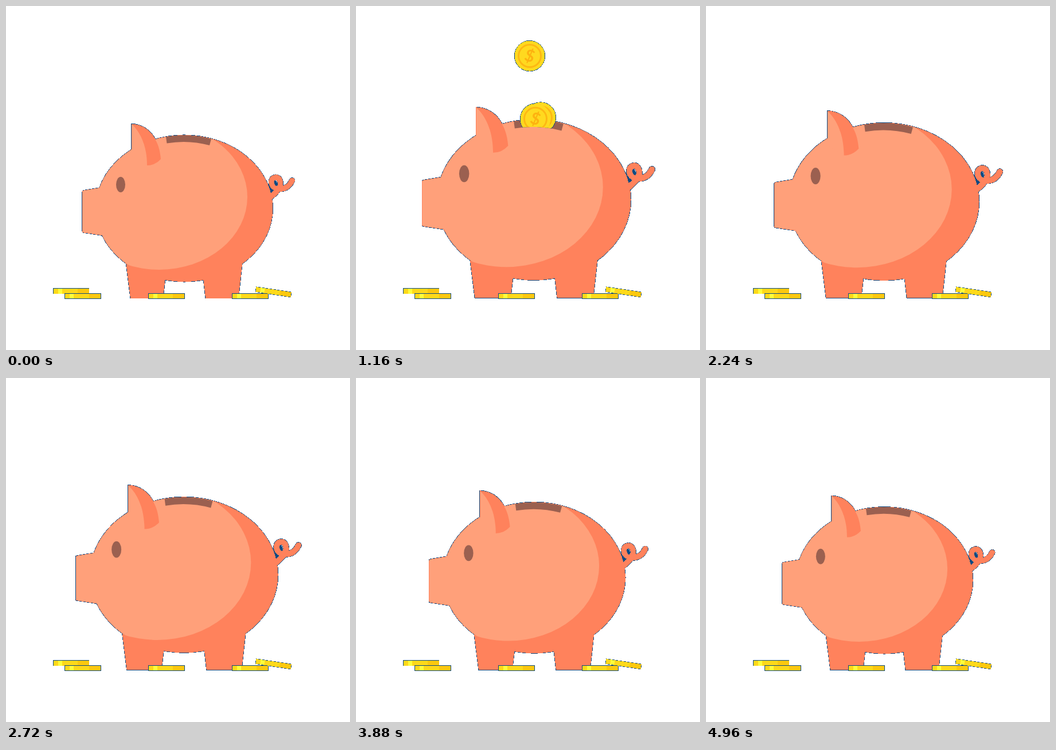
These frames come from a looping animation (600 px wide and 600 px high, 5000 ms). An HTML page:

```html
<!DOCTYPE html>
<html lang="en">
<head>
<meta charset="utf-8">
<title>Piggy bank</title>
<style>
  html, body { margin: 0; width: 100%; height: 100%; overflow: hidden; background: #fff; }
  svg { display: block; width: 100vw; height: 100vh; }
  .light { fill: #ffa07a; }
  .dark { fill: #ff825c; }
  .brown { fill: #9b6050; }
  .navy { fill: #0b4a82; }
  .crisp { shape-rendering: crispEdges; }
  .rim { fill: #0b4a82; stroke: #0b4a82; stroke-width: 1.2; shape-rendering: crispEdges; }
  .curl { fill: none; stroke-linecap: round; stroke-linejoin: round; shape-rendering: crispEdges; }
</style>
</head>
<body>
<svg viewBox="0 0 600 600">
  <defs>
    <g id="outline">
      <ellipse cx="311" cy="353" rx="154.500" ry="128"/>
      <path d="M135 321.600L163 317H190V402L166 400L135 395.300Q133 395 133 393V324Q133 322 135 321.600Z"/>
      <path d="M209 446L217 509.500H274L278 474Z"/>
      <path d="M344 474L348 509.500H405.500L412.500 446Z"/>
      <path d="M219 205.500C238 206 253 217 261 233L250 262H219Z"/>
    </g>
    <clipPath id="skin">
      <ellipse cx="311" cy="353" rx="154" ry="127.500"/>
      <path d="M135 322.100L163 317.500H190V402L166 399.500L135 394.800L133.500 393V324Z"/>
    </clipPath>
    <clipPath id="mouth">
      <path id="lip" d="M0 -600H600V243H355Q318 233 280.500 239.500H0Z"/>
    </clipPath>
    <path id="tail" d="M499 304.500C495 313 488 319 478 319C467 319 462.500 312 463 306C464 298.500 473 296.500 476.500 302C480 308 479 315 475 320C471 325 467 329 462 333"/>
    <g id="bar">
      <rect class="rim" width="62" height="8.500"/>
      <g class="crisp">
        <rect width="62" height="8.500" fill="#ffd91a"/>
        <rect x="8" width="7" height="8.500" fill="#ffff3c"/>
        <rect x="42" width="20" height="8.500" fill="#fcc80f"/>
      </g>
    </g>
    <circle id="halo" class="rim" r="26.500"/>
    <g id="coin">
      <circle class="crisp" r="26.500" fill="#ffd91f"/>
      <circle r="19.500" fill="none" stroke="#fdb813" stroke-width="3"/>
      <text transform="rotate(18)" y="10" text-anchor="middle" font-family="Lato, sans-serif" font-weight="700" font-size="29" fill="#fdb210">$</text>
    </g>
  </defs>

  <g id="pig">
    <use href="#outline" class="rim"/>
    <path class="navy" d="M457 309L468 323L461 328Z"/>
    <use href="#tail" class="curl" stroke="#0b4a82" stroke-width="10.800"/>
    <use href="#tail" class="curl" stroke="#ff825c" stroke-width="9.600"/>
    <ellipse class="navy" cx="470.500" cy="309" rx="2.400" ry="5" transform="rotate(-18 470.500 309)"/>
    <use href="#outline" class="dark crisp"/>
    <ellipse class="light" cx="267" cy="333" rx="154" ry="127" clip-path="url(#skin)"/>
    <path class="light" d="M219.500 206V262L246 278C246 248 237 222 219.500 206Z"/>
    <path class="dark" d="M219.500 206C238 206.500 252.500 217 260.500 233C267 244 269 256 270 267Q260 278 246 278C246 248 237 222 219.500 206Z"/>
    <path class="brown" d="M279 228.200Q318 221 358 232L355 243Q318 233 280.500 239.500Z"/>
    <ellipse class="brown" cx="200" cy="311.500" rx="8" ry="13.500"/>
  </g>

  <g id="drops" clip-path="url(#mouth)"><g id="halos"></g><g id="faces"></g></g>

  <use href="#bar" x="82.500" y="493"/>
  <use href="#bar" x="103" y="501.500"/>
  <use href="#bar" x="249" y="501.500"/>
  <use href="#bar" x="395" y="501.500"/>
  <use href="#bar" transform="translate(436.500 490) rotate(8.500)"/>
</svg>
<script>
  const LOOP = 5000;
  const SHRINK = 0.0000272;
  const REST = 200, GROW = 890, PEAK = 1370, SETTLE = 1640;
  const TOP = -28, END = 245;
  const byId = id => document.getElementById(id);
  const mix = (a, b, u) => a + (b - a) * u;

  function addUse(parent, href) {
    const el = document.createElementNS("http://www.w3.org/2000/svg", "use");
    el.setAttribute("href", href);
    byId(parent).append(el);
    return el;
  }

  const coins = [
    { x: 322, start: 840, time: 394 },
    { x: 313, start: 900, time: 317 },
    { x: 303, start: 1040, time: 287 }
  ];
  for (const c of coins) c.parts = [addUse("halos", "#halo"), addUse("faces", "#coin")];

  // Slow deflation, a quick swell as coins land, then a small settle.
  function pigScale(t) {
    const slow = time => 1 + (LOOP - time) * SHRINK;
    const small = 1 - REST * SHRINK, big = 1.125;
    if (t < REST) return 1 - t * SHRINK;
    if (t < GROW) return small;
    if (t < PEAK) return mix(small, big, Math.sin((t - GROW) / (PEAK - GROW) * Math.PI / 2));
    if (t < SETTLE) {
      const u = (t - PEAK) / (SETTLE - PEAK);
      return mix(big, slow(SETTLE), (1 - Math.cos(u * Math.PI)) / 2);
    }
    return slow(t);
  }

  function draw(t) {
    const pose = `translate(318.5 510) scale(${pigScale(t)}) translate(-318.5 -510)`;
    byId("pig").setAttribute("transform", pose);
    byId("lip").setAttribute("transform", pose);
    for (const c of coins) {
      const u = (t - c.start) / c.time;
      for (const el of c.parts) {
        el.setAttribute("visibility", u > 0 && u < 1 ? "visible" : "hidden");
        el.setAttribute("transform", `translate(${c.x} ${mix(TOP, END, u)})`);
      }
    }
  }

  const begin = performance.now();
  function tick() {
    draw((performance.now() - begin) % LOOP);
    requestAnimationFrame(tick);
  }
  draw(0);
  requestAnimationFrame(tick);
</script>
</body>
</html>
```
